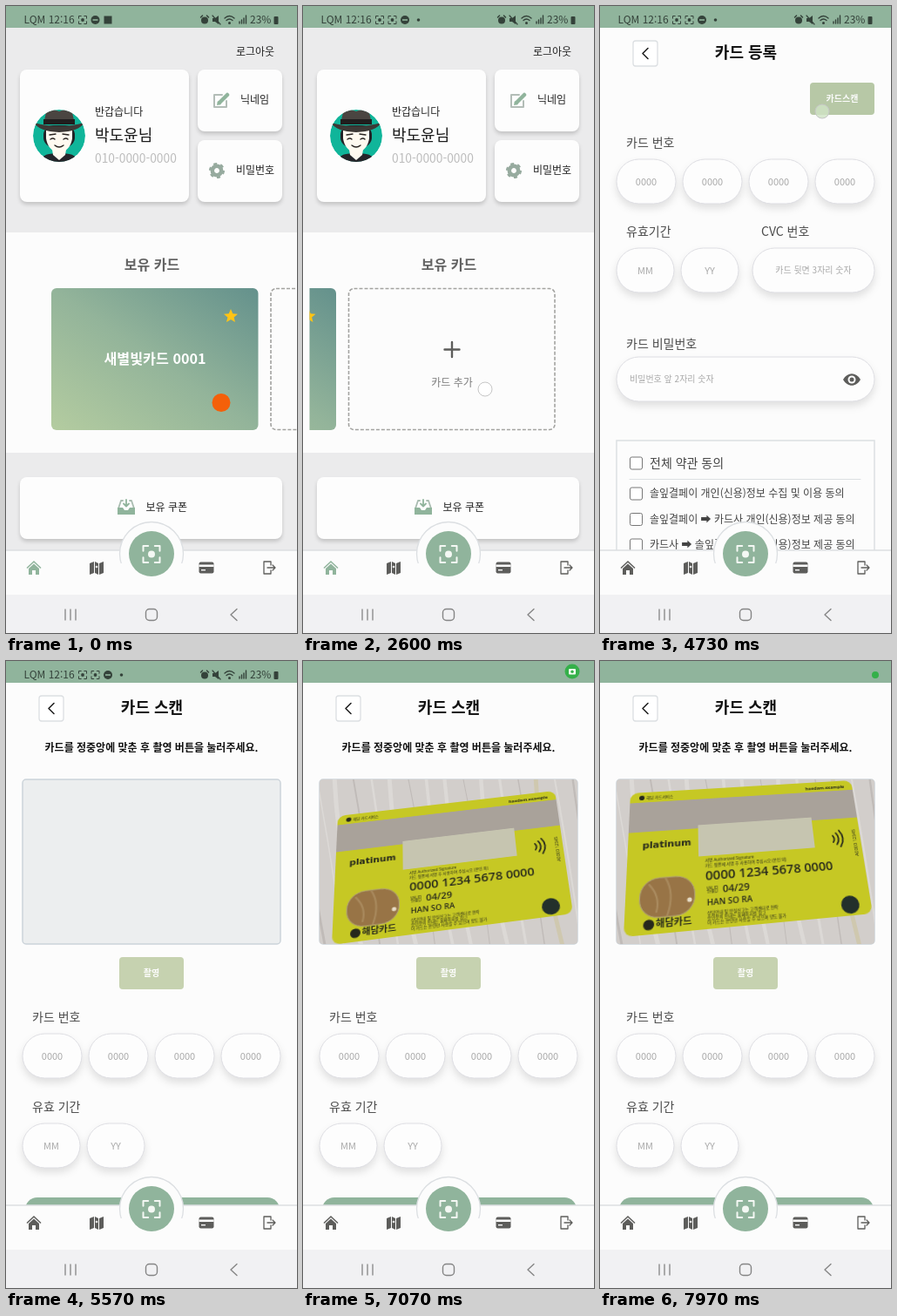
Recreate the animation shown at these times as an HTML page. Size 334x720 px, loop 8000 ms.

```html
<!DOCTYPE html>
<html lang="ko">
<head>
<meta charset="utf-8">
<style>
  html, body { margin: 0; width: 100%; height: 100%; overflow: hidden; background: #fcfcfc; }
  svg { position: absolute; left: 0; top: 0; display: block; }
  text { font-family: "Noto Sans CJK KR", "Noto Sans CJK", "Noto Sans", "DejaVu Sans", sans-serif; white-space: pre; }
  .box { fill: #fdfdfd; filter: drop-shadow(0 3px 2px #0000002a); }
  .pill { fill: #fdfdfd; stroke: #dddde2; filter: drop-shadow(0 5px 4px #0000001c); }
  .line { fill: none; stroke-linecap: round; stroke-linejoin: round; }
  #camera { position: absolute; left: 19px; top: 136px; width: 296px; height: 189px; overflow: hidden; border-radius: 4px; background: #d2cecb; }
  #card { left: -19px; top: -136px; transform-origin: 0 0; overflow: visible; }
  #card text { font-family: "Open Sans", "Noto Sans CJK KR", sans-serif; }
</style>
</head>
<body>
<svg id="stage" width="334" height="720"></svg>
<div id="camera">
  <svg id="desk" width="296" height="189"></svg>
  <svg id="card" width="260" height="165"></svg>
</div>
<script>
const GREEN = '#90b49c', DARK = '#5d5d5b', GREY = '#ebebec', WHITE = '#fcfcfc', PALE = '#dcdfe2', LABEL = '#4b4b4b', HINT = '#a9a9a9';
const $ = id => document.getElementById(id);

// y is the vertical centre of the text
const text = (x, y, s, size, color = '#262626', more = '') =>
  `<text x="${x}" y="${y + size * .37}" font-size="${size}" fill="${color}" ${more}>${s}</text>`;
const mid = (x, y, s, size, color, more = '') => text(x, y, s, size, color, `text-anchor="middle" ${more}`);
const rect = (x, y, w, h, r, more = '') => `<rect x="${x}" y="${y}" width="${w}" height="${h}" rx="${r}" ${more}/>`;
const dot = (x, y, r, fill, more = '') => `<circle cx="${x}" cy="${y}" r="${r}" fill="${fill}" ${more}/>`;
const line = (d, color = DARK, w = 1.2, more = '') => `<path class="line" d="${d}" stroke="${color}" stroke-width="${w}" ${more}/>`;
const shape = (d, fill, more = '') => `<path d="${d}" fill="${fill}" ${more}/>`;
const at = (x, y, body) => `<g transform="translate(${x} ${y})">${body}</g>`;
const group = (id, body) => `<g id="${id}">${body}</g>`;
const BOLD = 'font-weight="700"', MEDIUM = 'font-weight="500"';

const pill = (x, y, w, hint) => rect(x, y, w, 51, 25.5, 'class="pill"') + mid(x + w / 2, y + 25.5, hint, w > 100 ? 10 : 11, HINT);
const numberRow = y => [19, 95, 171, 247].map(x => pill(x, y, 68, '0000')).join('');
const dateRow = y => pill(19, y, 66, 'MM') + pill(93, y, 66, 'YY');
const button = (x, y, s, fill) => rect(x, y, 74, 37, 4, `fill="${fill}"`) + mid(x + 37, y + 18.5, s, 10, WHITE, BOLD);
const header = title => rect(0, 25, 334, 600, 0, `fill="${WHITE}"`)
  + rect(38, 40, 28, 29, 3, `fill="#fff" stroke="${PALE}" stroke-width="1.3"`)
  + line('M55 48.500l-6 6 6 6', '#222', 1.6) + mid(167.5, 53, title, 18, '#111', BOLD);

// Icons around their own centre
const frame = (s, c, w) => line(`M${-s} ${-s * .4}V${-s}H${-s * .4}M${s * .4} ${-s}H${s}V${-s * .4}M${s} ${s * .4}V${s}H${s * .4}M${-s * .4} ${s}H${-s}V${s * .4}`, c, w) + dot(0, 0, s * .42, c);
const home = shape('M-8.500 0L0-8 8.500 0l-1 1L0-6-7.500 1zM-6 1L0-4.500 6 1V8H2V3H-2V8H-6z', 'currentColor');
const mapIcon = shape('M-8-5l5-2v13l-5 2zM-2-7l4 2V8l-4-2zM3-5l5-2V6L3 8z', DARK) + dot(0, -1, 1.3, WHITE);
const creditCard = rect(-8.5, -6.5, 17, 13, 2, `fill="${DARK}"`) + rect(-8.5, -3.5, 17, 2.5, 0, `fill="${WHITE}"`) + rect(-6, 2, 5, 1.4, 0, `fill="${WHITE}"`);
const logout = line('M2-3V-7H-6V7H2V3M-2 0H7M4-3L7 0 4 3', DARK, 1.3);
const edit = line('M1-6H-8V8H6V1', '#b3bdb7', 2) + line('M-2 3L7-6', GREEN, 4.5) + shape('M-5 6l1-5 4 4z', GREEN);
const gear = dot(0, 0, 5.2, 'none', 'stroke="#97ab9f" stroke-width="4.500"') + dot(0, 0, 7.8, 'none', 'stroke="#97ab9f" stroke-width="2.500" stroke-dasharray="4 4.170"');
const inbox = line('M-4-7H-6L-9 2V8H9V2L6-7H4', '#a9bcb0', 1.8) + shape('M-10 1H-4L-2 4H2L4 1H10V9H-10z', GREEN) + line('M0-8V-1M-3-3.500L0-.5 3-3.500', GREEN, 1.8);
const eye = shape('M-10 0C-5-9 5-9 10 0 5 9-5 9-10 0z', DARK) + dot(0, 0, 4.5, WHITE) + dot(0, 0, 2.5, DARK);
const star = shape('M0-8L2.300-2.800 8-2.300 3.600 1.500 5 7 0 4-5 7-3.600 1.500-8-2.300-2.300-2.800z', '#ffc414');

const avatar = `<clipPath id="face"><circle cx="61" cy="149" r="30"/></clipPath><g clip-path="url(#face)">`
  + dot(61, 149, 30, '#10b59a') + shape('M38 182C39 171 48 169 61 169S83 171 84 182z', '#25252a')
  + shape('M53 165h16l-1 6-7 6-7-6z', '#fff9ef') + rect(43, 137, 36, 25, 11, 'fill="#222226"')
  + shape('M46 143Q61 139 76 143V152Q74 166 61 169 48 166 46 152z', '#fffaf0')
  + shape('M43 136L46 122Q53 117 61 121 69 117 76 122L79 136z', '#4a4541') + rect(43, 130, 36, 6, 0, 'fill="#201e1e"')
  + shape('M32 134Q61 142 90 134 84 144 61 145 38 144 32 134z', '#3d3936')
  + line('M50 148l7-1M65 147l7 1M51 153q3-2 5 0M66 153q3-2 5 0M56 160q5 4 10 0', '#2a2522', 1.4) + '</g>';

const homeScreen = rect(0, 25, 334, 600, 0, `fill="${GREY}"`) + text(264, 53, '로그아웃', 12, '#222', MEDIUM)
  + rect(16, 73, 194, 152, 8, 'class="box"') + rect(220, 73, 97, 71, 8, 'class="box"') + rect(220, 154, 97, 71, 8, 'class="box"')
  + avatar + text(102, 122, '반갑습니다', 12) + text(102, 148, '박도윤님', 18, '#1c1c1c', MEDIUM)
  + text(102, 175, '010-0000-0000', 13.8, '#bcbcbc', 'font-weight="300"')
  + at(247, 108, edit) + text(269, 108, '닉네임', 12, '#222', MEDIUM) + at(242, 189, gear) + text(264, 189, '비밀번호', 12, '#222', MEDIUM)
  + rect(0, 260, 334, 253, 0, `fill="${WHITE}"`) + mid(167.5, 297, '보유 카드', 16, '#626262', BOLD)
  + `<linearGradient id="sheen" x1="0" y1="1" x2="1" y2="0"><stop stop-color="#b4cca0"/><stop offset=".5" stop-color="#93b49a"/><stop offset="1" stop-color="#64918c"/></linearGradient>`
  + '<clipPath id="window"><path d="M7.500 315H334V495H7.500z"/></clipPath><g clip-path="url(#window)">'
  + group('carousel', rect(52, 324, 237.5, 163, 6, 'fill="url(#sheen)"') + at(258, 356, star)
    + mid(171, 405, '새별빛카드 0001', 16.2, '#fff', BOLD) + dot(247, 455.5, 10.5, '#f4600a')
    + rect(304, 324.5, 236.5, 162, 6, 'fill="none" stroke="#a3a3a0" stroke-width="1.600" stroke-dasharray="4 2"')
    + line('M422.500 386v17M414 394.500h17', DARK, 2.4) + mid(422.5, 433, '카드 추가', 12, '#7c7c7c')) + '</g>'
  + rect(16, 541, 301, 71, 8, 'class="box"') + at(138, 575, inbox) + text(160.5, 575.5, '보유 쿠폰', 12, '#222', MEDIUM);

const terms = [[525, '전체 약관 동의', 14], [560, '솔잎결페이 개인(신용)정보 수집 및 이용 동의', 12],
  [589.5, '솔잎결페이 ➡ 카드사 개인(신용)정보 제공 동의', 12], [619, '카드사 ➡ 솔잎결페이 개인(신용)정보 제공 동의', 12]];
const registerScreen = header('카드 등록') + button(241, 88, '카드스캔', '#b7c8a6')
  + text(30, 157, '카드 번호', 14, LABEL) + numberRow(176)
  + text(30, 259, '유효기간', 14, LABEL) + text(185, 259, 'CVC 번호', 14, LABEL)
  + dateRow(278) + pill(175, 278, 140, '카드 뒷면 3자리 숫자')
  + text(30, 388, '카드 비밀번호', 14, LABEL) + pill(19, 403, 296, '')
  + text(34, 428.5, '비밀번호 앞 2자리 숫자', 10, HINT) + at(289, 429, eye)
  + rect(19, 499, 296, 180, 0, `fill="none" stroke="${PALE}" stroke-width="1.500"`) + line('M34 543.500H299', PALE, 1)
  + terms.map(([y, s, size]) => rect(34.5, y - 7, 14, 14, 2, 'fill="#fff" stroke="#777"') + text(57, y, s, size, '#444')).join('');

const scanScreen = header('카드 스캔') + mid(167, 100, '카드를 정중앙에 맞춘 후 촬영 버튼을 눌러주세요.', 12, '#111', BOLD)
  + rect(19, 136, 296, 189, 4, 'fill="#eceeef" stroke="#ccd4da" stroke-width="1.500"') + button(130, 340, '촬영', '#c6d2b0')
  + text(30, 409, '카드 번호', 14, LABEL) + numberRow(428)
  + text(30, 512, '유효 기간', 14, LABEL) + dateRow(531) + rect(22, 616, 292, 40, 14, `fill="${GREEN}"`);

const bar = '#34423a';
const noEntry = dot(0, 0, 5, bar) + rect(-3, -.8, 6, 1.6, 0, `fill="${GREEN}"`);
const statusBar = rect(0, 0, 334, 25, 0, `fill="${GREEN}"`) + group('status',
  text(20.5, 16, 'LQM 12:16', 12, bar) + at(88, 16, frame(4.5, bar, 1))
  + group('before', at(102.5, 16, noEntry) + rect(112.5, 11.5, 9, 9, 0, `fill="${bar}"`))
  + group('after', at(102.5, 16, frame(4.5, bar, 1)) + at(117, 16, noEntry) + dot(132.5, 16, 1.8, bar))
  + dot(228, 16.5, 4, bar) + line('M223.500 13l2-2M230.500 11l2 2', bar, 1.5)
  + shape('M237 14h3l4-3v10l-4-3h-3z', bar) + line('M237 11l9 10', bar, 1.2)
  + line('M251 14q5.500-5 11 0M253 16.500q3.500-3 7 0', bar, 1.3) + dot(256.5, 19.5, 1.5, bar)
  + line('M268 20v-2M270.500 20v-4M273 20v-6M275.500 20v-9', bar, 1.4)
  + text(280, 16, '23%', 12, bar) + rect(307.5, 12, 5, 9, 1, `fill="${bar}"`))
  + group('privacy', dot(0, 0, 8.5, '#35b04a') + group('lens', rect(-4, -3, 8, 6.5, 1, 'fill="#f4fff4"') + dot(0, .3, 1.7, '#35b04a')));

const nav = rect(0, 625, 334, 51, 0, `fill="${WHITE}"`) + line('M0 625H334', PALE, 1.5)
  + dot(167, 629, 36.5, WHITE, `stroke="${PALE}" stroke-width="1.300"`) + rect(125, 640, 84, 36, 0, `fill="${WHITE}"`)
  + dot(167, 629, 26, GREEN) + at(167, 629.5, frame(9.5, '#f4f8f4', 2))
  + group('homeIcon', at(32, 645, home)) + at(104, 645, mapIcon) + at(230, 645, creditCard) + at(302, 645, logout)
  + rect(0, 676, 334, 44, 0, 'fill="#f1f1f3"') + line('M68 693v12M74 693v12M80 693v12', '#858585', 1.3)
  + rect(160.5, 692.5, 13, 13, 4, 'fill="none" stroke="#858585" stroke-width="1.400"') + line('M265 692.500l-7 6.500 7 6.500', '#858585', 1.4);

$('stage').innerHTML = group('home', homeScreen) + group('register', registerScreen) + group('scan', scanScreen)
  + nav + statusBar + '<circle id="touch" r="8" stroke="#c6c6c6"/>';

// Wood grain behind the bank card
$('desk').innerHTML = Array.from({ length: 17 }, (_, i) => {
  const x = i * 21 - 25, bend = 8 * Math.sin(i * 2.3);
  return line(`M${x} -5Q${x + 12 + bend} 90 ${x + 32} 195`, i == 13 ? '#cfc6a4' : i % 3 ? '#e2dfdc' : '#b9b4b1', 3 + 2 * Math.sin(i * 4), 'opacity=".7"');
}).join('');

const INK = '#26281c';
const SEMI = 'font-weight="600"';
const tiny = (x, y, s) => text(x, y, s, 4.5, INK);
$('card').innerHTML = rect(0, 0, 260, 165, 9, 'fill="#c6c824"') + rect(0, 13, 260, 37, 0, 'fill="#a9a29a"')
  + dot(13, 7, 3, INK) + tiny(18, 7, '해담 카드서비스') + text(203, 8, 'haedam.example', 5.5, INK, BOLD)
  + rect(76, 46, 130, 38, 0, 'fill="#c6c5b0"')
  + `<text x="15.500" y="70" font-size="10.500" fill="${INK}" ${BOLD} style="font-family:'DejaVu Sans',sans-serif">platinum</text>`
  + tiny(83, 89, '서명 Authorized Signature') + tiny(83, 95, '카드 뒷면에 서명 후 사용하여 주십시오 (본인 외)')
  + text(83, 107, '0000 1234 5678 0000', 14.2, INK, SEMI)
  + tiny(84, 121, 'VALID') + tiny(84, 125.5, 'THRU') + text(101, 123.5, '04/29', 10.8, INK, SEMI)
  + text(84, 137, 'HAN SO RA', 9, INK, SEMI)
  + ['상담안내 및 분실신고는 고객센터로 연락', '승인문의 안내는 홈페이지를 참고', '이 카드는 본인만 사용할 수 있으며 양도 불가'].map((s, i) => tiny(84, 148 + i * 5.2, s)).join('')
  + rect(14.5, 105, 57, 43, 20, 'fill="#987446" stroke="#b0a27a"') + line('M24 112q12 14 8 30M41 106q10 18 2 41', '#a98a5e', 2) + dot(66, 132, 2.5, '#e6dcc6')
  + dot(24.5, 155, 5.5, INK) + text(31.5, 154.5, '해담카드', 10, INK, BOLD)
  + dot(237, 153, 10, '#23302b')
  + line('M228 71q3 4 0 8M232 68q5 7 0 14M236 65q7 10 0 20', INK, 1.8)
  + `<text transform="translate(255 98) rotate(-90)" font-size="5.500" fill="${INK}">A0000 12345</text>`;

// Card corners in order TL, TR, BR, BL
const poses = [
  [5900, [44, 214, 204, 188, 222, 291, 44, 322]],
  [6430, [41, 207, 216, 180, 236, 290, 40, 324]],
  [7070, [40, 178, 289, 149, 310, 290, 33, 326]],
  [7970, [35, 152, 288, 137, 313, 290, 27, 317]],
];
const show = (id, on) => { $(id).style.display = on ? '' : 'none'; };
const progress = (t, a, b) => Math.min(1, Math.max(0, (t - a) / (b - a)));
const easeOut = p => 1 - (1 - p) ** 3;
const smooth = p => p * p * (3 - 2 * p);

function corners(t) {
  const i = Math.max(1, poses.findIndex(([time]) => time >= t));
  if (t >= 7970) return poses[3][1];
  const [t0, a] = poses[i - 1], [t1, b] = poses[i];
  return a.map((v, k) => v + (b[k] - v) * smooth(progress(t, t0, t1)));
}
function perspective([x0, y0, x1, y1, x2, y2, x3, y3], w, h) {
  const ax = x1 - x2, ay = y1 - y2, bx = x3 - x2, by = y3 - y2, sx = x0 - x1 + x2 - x3, sy = y0 - y1 + y2 - y3;
  const det = ax * by - bx * ay, g = (sx * by - bx * sy) / det, k = (ax * sy - sx * ay) / det;
  return `matrix3d(${[(x1 - x0 + g * x1) / w, (y1 - y0 + g * y1) / w, 0, g / w,
    (x3 - x0 + k * x3) / h, (y3 - y0 + k * y3) / h, 0, k / h, 0, 0, 1, 0, x0, y0, 0, 1].map(n => n.toFixed(9))})`;
}

// start, end, from x, to x, y, fill
const touches = [[930, 1160, 235, 115, 420, '#ffffff66'], [2430, 2660, 209, 209, 440, '#ffffffcc'], [4480, 4790, 255, 255, 121, '#cfe3c4d0']];

function draw(t) {
  const page = t < 2670 ? 'home' : t < 4800 ? 'register' : 'scan';
  for (const id of ['home', 'register', 'scan']) show(id, id == page);
  $('homeIcon').setAttribute('color', page == 'home' ? GREEN : DARK);
  const drag = 120 * smooth(progress(t, 930, 1160)), snap = 131.5 * easeOut(progress(t, 1160, 1500));
  $('carousel').setAttribute('transform', `translate(${-drag - snap} 0)`);
  show('before', t < 300);
  show('after', t >= 300);

  const touch = touches.find(([a, b]) => t >= a && t < b);
  show('touch', touch);
  if (touch) {
    const [a, b, from, to, y, fill] = touch;
    $('touch').setAttribute('cx', from + (to - from) * smooth(progress(t, a, b)));
    $('touch').setAttribute('cy', y);
    $('touch').setAttribute('fill', fill);
  }

  show('status', t < 5880);
  show('privacy', t >= 5880);
  const shrink = progress(t, 7915, 7965);
  show('lens', shrink < .5);
  $('privacy').setAttribute('transform', `translate(${309 + 7 * shrink} ${12 + 4 * shrink}) scale(${1 - .53 * shrink})`);
  show('camera', t >= 5900);
  $('card').style.transform = perspective(corners(t), 260, 165);
}
function tick() {
  draw(performance.now() % 8000);
  requestAnimationFrame(tick);
}
tick();
</script>
</body>
</html>
```
